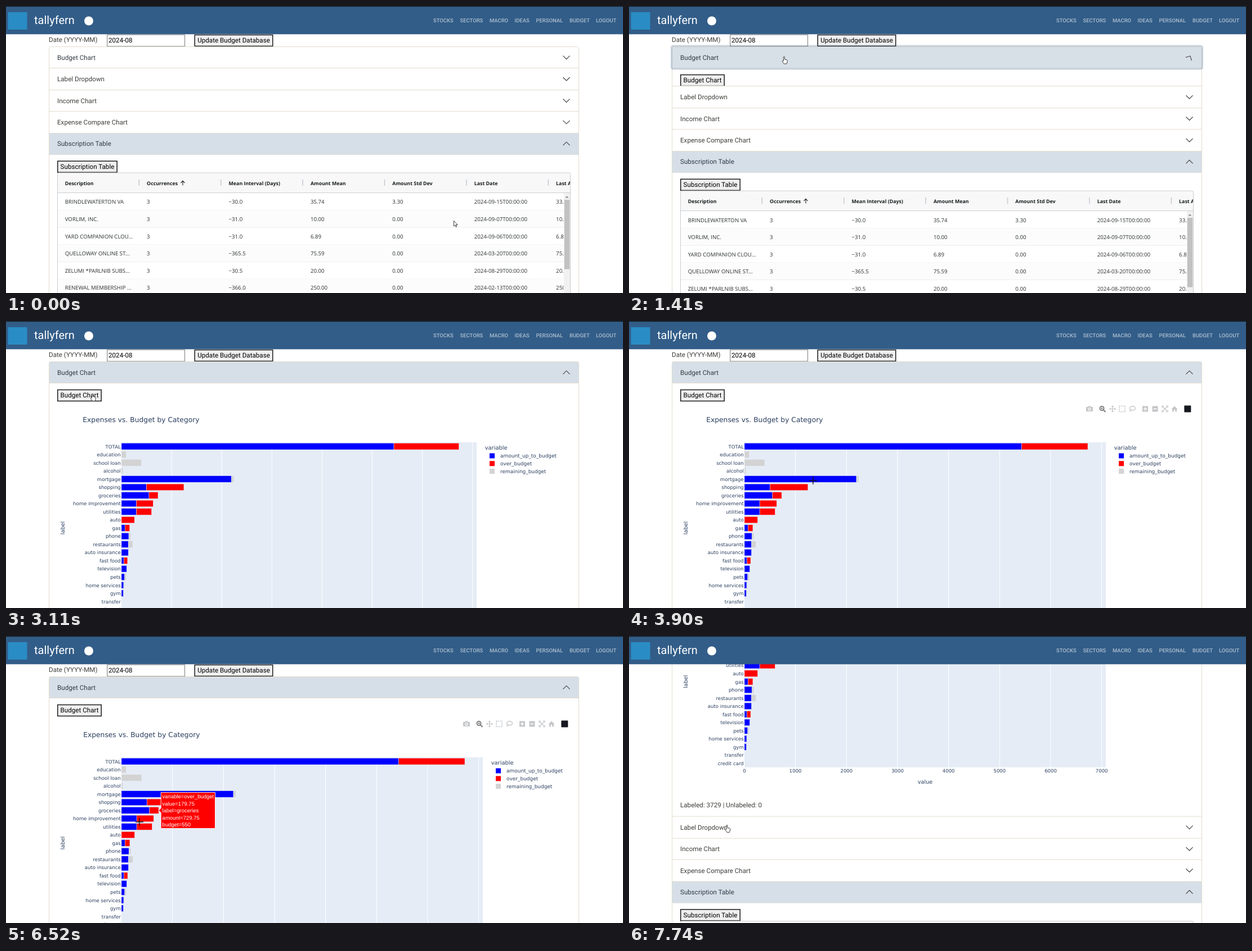
An HTML page for the animation above (8000 ms loop, 1096x511 px).

```html
<!DOCTYPE html>
<html lang="en">
<head>
<meta charset="utf-8">
<title>Budget dashboard</title>
<style>
html, body { margin: 0; width: 100%; height: 100%; overflow: hidden; background: #fff; }
svg { display: block; width: 100%; height: 100%; }
text { white-space: pre; text-rendering: geometricPrecision; }
.ui { font-family: Roboto, sans-serif; }
.grid { font-family: "Open Sans", "Noto Sans", sans-serif; }
.plot { font-family: "DejaVu Sans", sans-serif; }
.tip { font-family: "Liberation Sans", Arial, sans-serif; }
</style>
</head>
<body>
<svg id="stage" viewBox="0 0 1096 511"></svg>
<script>
const LOOP = 8000, TICK = 100.3;
const BORDER = '#e2dccf', INK = '#3e3f3a', ACTIVE = '#d6dfe7', NAVY = '#2a3f5f';
const BLUE = '#0000ff', RED = '#ff0000', GREY = '#d3d3d3';

// Markup helpers; text is placed by the middle of its capitals.
const text = (cls, size, x, midY, str, fill = INK, more = '') =>
  `<text class="${cls}" x="${x}" y="${(midY + size * 0.357).toFixed(2)}" font-size="${size}" fill="${fill}" ${more}>${str}</text>`;
const rect = (x, y, w, h, fill, more = '') =>
  `<rect x="${x}" y="${y}" width="${w}" height="${h}" fill="${fill}" ${more}/>`;
const path = (d, stroke, width = 1, fill = 'none', more = '') =>
  `<path d="${d}" stroke="${stroke}" stroke-width="${width}" fill="${fill}" ${more}/>`;
const group = (id, body, more = '') => `<g id="${id}" ${more}>${body}</g>`;

const button = (x, y, w, label) =>
  rect(x + 0.75, y + 0.5, w - 1.5, 20, '#efefef', 'stroke="#1c1c1c" stroke-width="1.5"') +
  text('ui', 11.65, x + w / 2, y + 10.3, label, '#000', 'text-anchor="middle"');

const chevron = (y, id = '', turn = 0) =>
  `<g transform="translate(995.5 ${y})"><path ${id && `id="${id}"`} transform="rotate(${turn})" d="M-6-3L0 3L6-3" fill="none" stroke="#3a3a3a" stroke-width="1.1"/></g>`;

function header() {
  const links = [['STOCKS', 759], ['SECTORS', 806.5], ['MACRO', 859], ['IDEAS', 903.5],
    ['PERSONAL', 941.5], ['BUDGET', 1001], ['LOGOUT', 1048]];
  return rect(0, 0, 1096, 50.3, '#325d88') + rect(0, 0, 1096, 1.2, '#15191d') +
    rect(3.5, 11, 34, 31, '#2a8cc4') +
    text('ui', 20, 50, 25.3, 'tallyfern', '#fff') +
    '<circle cx="147" cy="26.5" r="8" fill="#fff"/>' +
    links.map(([s, x]) => text('ui', 9.45, x, 26, s, '#adbecf', 'font-weight="500"')).join('');
}

function form() {
  return text('ui', 11.65, 76, 59.5, 'Date (YYYY-MM)') +
    rect(179.8, 51.2, 137.7, 20.6, '#fff', 'stroke="#8a8a8a" stroke-width="1.2"') +
    text('ui', 11.65, 182, 61.3, '2024-08', '#000') +
    button(334.5, 51, 140, 'Update Budget Database');
}

function table() {
  const titles = ['Description', 'Occurrences', 'Mean Interval (Days)', 'Amount Mean',
    'Amount Std Dev', 'Last Date', 'Last Amount'];
  const rows = [
    'BRINDLEWATERTON VA|3|−30.0|35.74|3.30|2024-09-15|33.30',
    'VORLIM, INC.|3|−31.0|10.00|0.00|2024-09-07|10.00',
    'YARD COMPANION CLOU...|3|−31.0|6.89|0.00|2024-09-06|6.89',
    'QUELLOWAY ONLINE ST...|3|−365.5|75.59|0.00|2024-03-20|75.59',
    'ZELUMI *PARLNIB SUBS...|3|−30.5|20.00|0.00|2024-08-29|20.00',
    'RENEWAL MEMBERSHIP ...|3|−366.0|250.00|0.00|2024-02-13|250.00'];
  const colX = i => 104.7 + 145.4 * i;
  let head = rect(92, 297.5, 910.5, 35, '#f8f8f8'), cells = '';
  titles.forEach((s, i) => {
    head += text('grid', 8.85, colX(i), 315.5, s, '#181d1f', 'font-weight="700"');
    if (i) head += rect(colX(i) - 14.6, 309, 1.6, 11, '#c5ccd6');
  });
  head += path('M314 319.5V311.5M310.5 315L314 311.3L317.5 315', '#222', 1.1);
  rows.forEach((row, r) => {
    const y = 333 + 30.6 * r;
    if (r % 2) cells += rect(92, y, 899, 30.6, '#fcfcfc');
    cells += rect(92, y + 30.2, 899, 0.8, '#e9eaeb');
    row.split('|').forEach((s, i) => {
      cells += text('grid', 9.7, colX(i), y + 16, i === 5 ? s + 'T00:00:00' : s, '#2b2f31');
    });
  });
  return `<clipPath id="headClip">${rect(92, 290, 910, 60, '#000')}</clipPath>
    <clipPath id="cellClip">${rect(92, 330, 898.5, 240, '#000')}</clipPath>
    <g clip-path="url(#headClip)">${head}</g><g clip-path="url(#cellClip)">${cells}</g>` +
    rect(991, 333, 11, 260, '#f1f1f1') + rect(991.8, 345, 9.4, 123.5, '#c1c1c1') +
    path('M993.3 341.5L996.3 338.3L999.3 341.5Z', 'none', 0, '#8a8a8a') +
    path('M91.5 600V299.5Q91.5 297 94 297H1000Q1002.5 297 1002.5 299.5V600M91.5 332.5H1002.5', '#c9cdd1');
}

// Everything under the first panel, placed as if that panel were closed.
function lowerPanels() {
  const top = i => Math.floor(110.9 + 38.4 * i);
  let out = rect(77, 110, 940, 900, '#fff');
  ['Label Dropdown', 'Income Chart', 'Expense Compare Chart', 'Subscription Table'].forEach((s, i) => {
    const mid = 130 + 38.4 * i, open = i === 3;
    if (open) out += rect(77, top(i), 940, 38.2, ACTIVE);
    out += path(`M77 ${top(i) + 0.5}H1017`, BORDER) + text('ui', 11.65, 91, mid, s, open ? '#2d3b4a' : INK) +
      chevron(mid, '', open ? 180 : 0);
  });
  return out + path('M77 264.5H1017', '#d9dcdc') + button(91, 275.7, 107, 'Subscription Table') + table();
}

// Each row: name, spent within budget, over budget, remaining.
const SPENDING = [
  ['TOTAL', 5432, 1296], ['education', 0, 0, 95], ['school loan', 0, 0, 397], ['alcohol', 0, 0, 30],
  ['mortgage', 2195, 0, 45], ['shopping', 500, 745], ['groceries', 550, 179.75],
  ['home improvement', 300, 332], ['utilities', 300, 301], ['auto', 0, 260], ['gas', 70, 95],
  ['phone', 147, 0, 38], ['restaurants', 140, 0, 85], ['auto insurance', 138], ['fast food', 50, 72],
  ['television', 105], ['pets', 65, 0, 28], ['home services', 45, 0, 14], ['gym', 38],
  ['transfer'], ['credit card']];

function chart(width, titleX) {
  const left = 205, top = 216, rowH = 14.53, height = rowH * SPENDING.length;
  const unit = width / 7081, mid = i => top + rowH * (i + 0.5);
  let out = rect(left, top, width, height, '#e5ecf6');
  for (let k = 0; k <= 7; k++) {
    const x = left + k * 1000 * unit;
    if (k) out += rect(x - 0.5, top, 1, height, '#fff');
    out += text('plot', 8.5, x, 527.2, k * 1000, NAVY, 'text-anchor="middle"');
  }
  SPENDING.forEach(([name, ...parts], i) => {
    let x = left;
    out += text('plot', 8.6, 203.8, mid(i) + 0.2, name, NAVY, 'text-anchor="end"');
    parts.forEach((value, p) => {
      const w = value * unit;
      if (w) out += rect(x, mid(i) - 5.8, w, 11.6, [BLUE, RED, GREY][p], 'stroke="#e5ecf6" stroke-width=".5"');
      x += w;
    });
  });
  const lx = left + width + 14.7;
  out += text('plot', 9.9, lx, 225.5, 'variable', NAVY);
  ['amount_up_to_budget', 'over_budget', 'remaining_budget'].forEach((s, i) => {
    const y = 240 + 13.8 * i;
    out += rect(lx + 8.3, y - 4.5, 9, 9, [BLUE, RED, GREY][i]) + text('plot', 8.95, lx + 27.4, y, s, NAVY);
  });
  return out + text('plot', 12.3, titleX, 175.3, 'Expenses vs. Budget by Category', NAVY) +
    text('plot', 9.7, left + width / 2, 546.5, 'value', NAVY, 'text-anchor="middle"') +
    `<g transform="translate(100.5 368.5) rotate(-90)">${text('plot', 9.7, 0, 0, 'label', NAVY, 'text-anchor="middle"')}</g>`;
}

function toolbar() {
  const c = '#c4c6c9', at = (x, body) => `<g transform="translate(${x} 156.5)">${body}</g>`;
  const sign = d => rect(-5, -5, 10, 10, c) + path(d, '#fff', 1.6);
  return at(818, rect(-6, -3.5, 12, 8, c, 'rx="1"') + rect(-2.5, -5, 5, 3, c) +
      '<circle cy=".5" r="2.2" fill="' + c + '" stroke="#fff" stroke-width="1.2"/>') +
    at(841, '<circle cx="-1" cy="-1" r="3.6" fill="none" stroke="#777" stroke-width="1.8"/>' +
      path('M2 2L5.5 5.5', '#777', 2) + path('M-3-1H1M-1-3V1', '#777', 1)) +
    at(859, path('M-5 0H5M0-5V5M-3.5-1.7L-5.2 0L-3.5 1.7M3.5-1.7L5.2 0L3.5 1.7M-1.7-3.5L0-5.2L1.7-3.5M-1.7 3.5L0 5.2L1.7 3.5', c, 1.2)) +
    at(876, rect(-5, -5, 10, 10, 'none', `stroke="${c}" stroke-width="1.5" stroke-dasharray="2 1.3"`)) +
    at(894, `<ellipse cx=".5" cy="-1.2" rx="5" ry="3.6" fill="none" stroke="${c}" stroke-width="1.4"/>` +
      path('M-3 1.5Q-5 3-2.5 5', c, 1.4)) +
    at(917, sign('M-3 0H3M0-3V3')) + at(934.5, sign('M-3 0H3')) +
    at(952, path('M-5-2V-5H-2M2-5H5V-2M5 2V5H2M-2 5H-5V2M-3.5-3.5L3.5 3.5M3.5-3.5L-3.5 3.5', c, 1.3)) +
    at(969, path('M-5.5 .5L0-5L5.5 .5H4V5H1.3V1.5H-1.3V5H-4V.5Z', 'none', 0, c)) +
    at(992.3, rect(-6, -6, 12, 12, '#15191f', 'rx="1"'));
}

function tooltip(id, x, y, label, over, amount, budget) {
  const lines = ['variable=over_budget', 'value=' + over, 'label=' + label, 'amount=' + amount, 'budget=' + budget];
  return group(id, path(`M${x} ${y}l4-4v-28h96.3v64h-96.3v-28Z`, '#fff', 0.9, RED) +
    lines.map((s, i) => text('tip', 9.5, x + 6.4, y + (i - 2) * 12.4 + 0.3, s, '#fff')).join(''));
}

const CURSORS = {
  arrow: path('M0 0V9.5L2.2 7.6L3.7 11L5.2 10.3L3.7 7H6.6Z', '#111', 0.8, '#fff'),
  hand: path('M3 8V1.6a1 1 0 0 1 2 0V5.5l3.6.8q1.4.4 1.2 1.8l-.6 3.4-.8 2H4L1 9.4Q.4 8.2 1.4 7.8Q2.2 7.6 3 8.6Z', '#111', 0.8, '#fff'),
  cross: path('M-7 0H7M0-7V7', '#111', 1.3)
};

document.getElementById('stage').innerHTML =
  group('page', form() +
    group('budgetFill', rect(77, 72.5, 940, 38, ACTIVE)) +
    text('ui', 11.65, 91, 91.7, 'Budget Chart', '#333b42') + chevron(91.7, 'budgetChevron') +
    path('M77 110.5H1017', BORDER) + button(91, 122, 79, 'Budget Chart') +
    group('narrowChart', chart(631, 136.3)) + group('wideChart', chart(642, 137.2)) +
    text('ui', 11.65, 91, 588, 'Labeled: 3729 | Unlabeled: 0', INK, 'id="count"') +
    group('modebar', toolbar()) +
    group('lower', lowerPanels()) +
    path('M76.5 1400V75.5Q76.5 72.5 79.5 72.5H1014.5Q1017.5 72.5 1017.5 75.5V1400', BORDER) +
    rect(75.5, 71, 943, 41, 'none', 'id="focusRing" rx="3" stroke="#325d88" stroke-opacity=".26" stroke-width="3"') +
    tooltip('shoppingTip', 318.3, 296, 'shopping', 745.83, 1245.83, 500) +
    tooltip('groceriesTip', 271.2, 310.6, 'groceries', 179.75, 729.75, 550)) +
  header() +
  Object.entries(CURSORS).map(([kind, body]) => group(kind, body)).join('');

const el = id => document.getElementById(id);
const show = (id, on) => el(id).setAttribute('display', on ? 'inline' : 'none');
const move = (id, x, y) => el(id).setAttribute('transform', `translate(${x} ${y})`);

// Pointer path: tick, x, y, shape.
const POINTER = [
  [0, 795.5, 382.5, 'arrow'], [1, 640, 280, 'arrow'], [2, 519, 198, 'hand'], [4, 505, 190, 'hand'],
  [7, 375, 124, 'hand'], [10, 270, 79, 'hand'], [12, 271.5, 89.5, 'hand'], [15, 271.5, 89.5, 'hand'],
  [19, 170, 122, 'hand'], [21, 149.5, 129, 'hand'], [34, 149.5, 129, 'hand'],
  [35, 172, 160, 'arrow'], [36, 212, 198, 'arrow'], [37, 270, 240, 'cross'], [39, 327, 284, 'cross'],
  [40, 296, 302, 'cross'], [51, 296.5, 302, 'cross'], [52, 297, 299, 'cross'], [53, 295, 299, 'cross'],
  [54, 282, 307, 'cross'], [56, 268, 310, 'cross'], [64, 268, 310, 'cross'], [65, 237, 331, 'cross'],
  [66, 185, 390, 'arrow'], [67, 162, 424.5, 'arrow'], [76, 162, 424.5, 'arrow'], [77, 170, 336, 'hand']];
const OPENING = { 13: 0.14, 14: 0.72, 15: 0.93 };
const SCROLL = { 70: 99, 71: 198.2, 72: 252, 73: 279, 74: 287.3 };

function pointerAt(tick) {
  const next = POINTER.findIndex(p => p[0] > tick);
  if (next < 0) return POINTER[POINTER.length - 1].slice(1);
  const a = POINTER[next - 1], b = POINTER[next], k = (tick - a[0]) / (b[0] - a[0]);
  return [a[1] + (b[1] - a[1]) * k, a[2] + (b[2] - a[2]) * k, a[3]];
}

function render(ms) {
  const tick = Math.floor((ms + 12) / TICK);
  const open = tick < 13 ? 0 : OPENING[tick] ?? 1;
  const loaded = tick >= 31;
  move('lower', 0, loaded ? 498 : 44.6 * open);
  move('page', 0, tick < 70 ? 0 : -(SCROLL[tick] ?? 287.3));
  el('budgetFill').setAttribute('opacity', Math.min(1, open * 1.35));
  el('budgetChevron').setAttribute('transform', `rotate(${-180 * Math.min(1, open * 1.17)})`);
  show('focusRing', tick >= 13 && tick < 22);
  show('narrowChart', loaded && tick < 33);
  show('wideChart', tick >= 33);
  show('count', loaded);
  show('modebar', tick >= 35);
  show('shoppingTip', tick === 52 || tick === 53);
  show('groceriesTip', tick >= 54 && tick < 66);
  const [x, y, shape] = pointerAt(tick);
  for (const kind in CURSORS) show(kind, kind === shape);
  move(shape, x, y);
}

const start = performance.now();
(function frame() {
  render((performance.now() - start) % LOOP);
  requestAnimationFrame(frame);
})();
</script>
</body>
</html>
```
